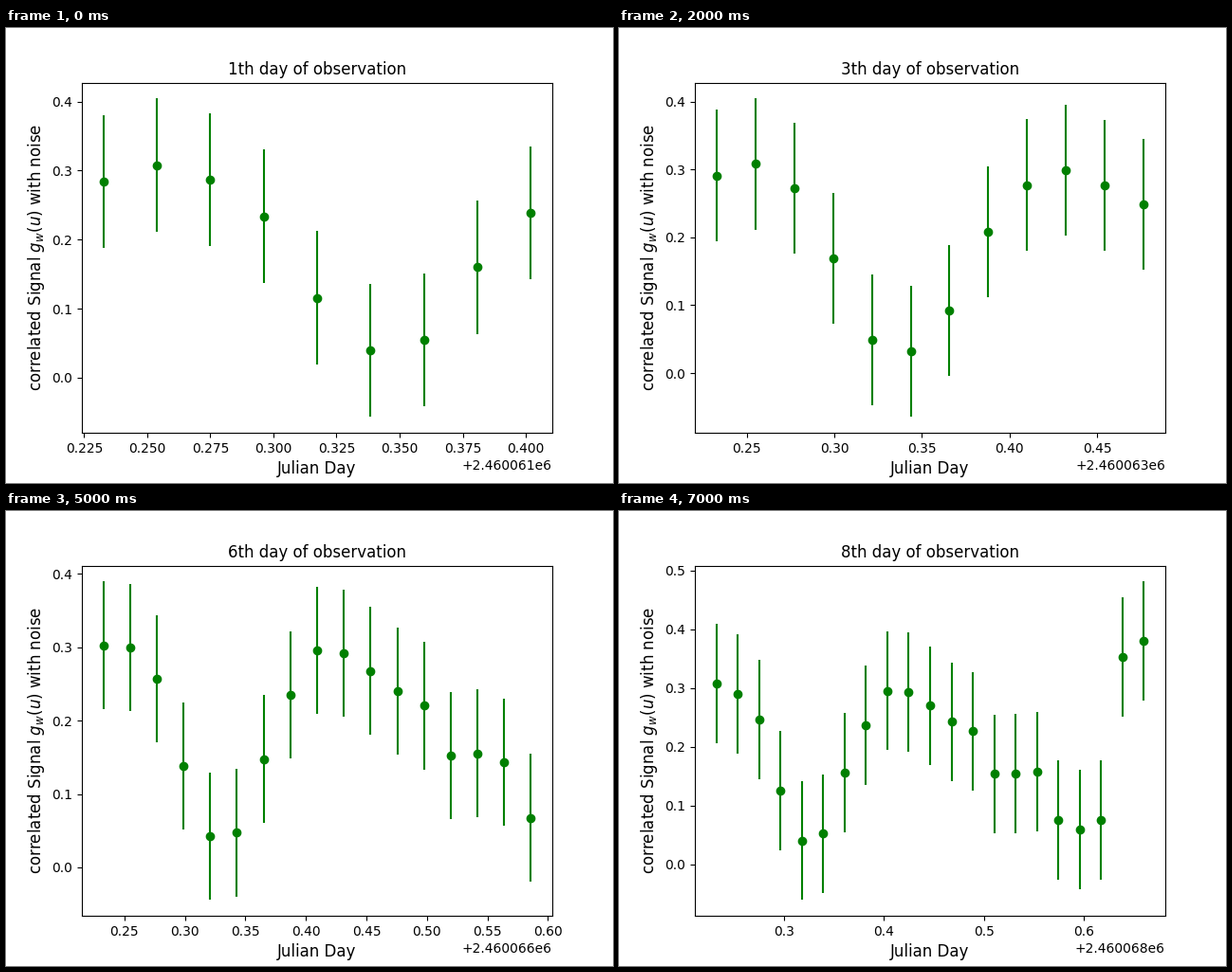
Write a matplotlib script that moves like this. It is 640x480 px and loops after 8000 ms.

```python
import numpy as np
import matplotlib.pyplot as plt
from matplotlib.animation import FuncAnimation

DAYS = 8
EPOCH = 2460060
START = 0.2326            # first sample of each night, in days
SAMPLES_PER_DAY = 48
SIDEREAL_SHIFT = 0.00273  # the sky runs ahead by this much every day

# the nights grow longer along a smooth cubic
night_end = np.poly1d(np.polyfit([1, 3, 6, 8],
                                 [0.4020, 0.4768, 0.5859, 0.6600], 3))

# key points of the signal: sidereal time, level
CURVE = np.array([
    (0.233, 0.284), (0.250, 0.308), (0.264, 0.308), (0.294, 0.250),
    (0.305, 0.166), (0.316, 0.125), (0.327, 0.048), (0.350, 0.031),
    (0.359, 0.053), (0.371, 0.090), (0.380, 0.157), (0.401, 0.236),
    (0.422, 0.295), (0.434, 0.302), (0.456, 0.282), (0.488, 0.241),
    (0.510, 0.225), (0.530, 0.152), (0.574, 0.158), (0.595, 0.070),
    (0.617, 0.058), (0.638, 0.077), (0.658, 0.357), (0.679, 0.380),
])


def observe(day):
    """Sample times of one night and the signal seen at them."""
    end = night_end(day)
    count = int((end - START) * SAMPLES_PER_DAY) + 1
    times = np.linspace(START, end, count)
    sidereal = times + SIDEREAL_SHIFT * (day - 1)
    return times, np.interp(sidereal, *CURVE.T)


fig, ax = plt.subplots(figsize=(6.4, 4.8), dpi=100)


def draw(i):
    day = i + 1
    times, level = observe(day)
    ax.clear()
    ax.errorbar(EPOCH + day + times, level, yerr=np.std(level),
                fmt="o", color="g")
    ax.set_title(f"{day}th day of observation")
    ax.set_xlabel("Julian Day", fontsize=12)
    ax.set_ylabel(r"correlated Signal $g_w(u)$ with noise", fontsize=12)


anim = FuncAnimation(fig, draw, frames=DAYS, init_func=lambda: draw(0),
                     interval=1000, repeat=True, repeat_delay=0)
plt.show()
```
